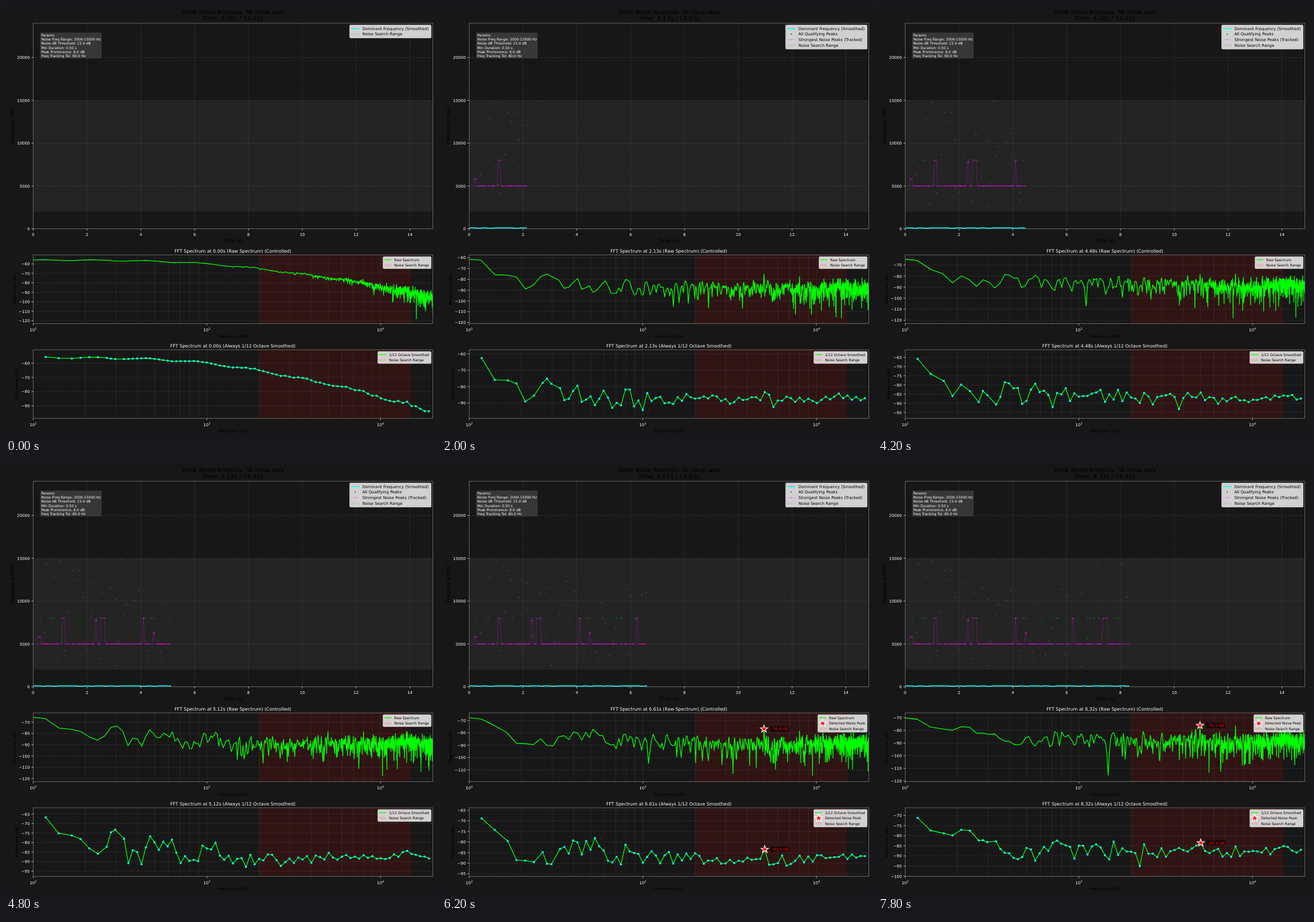
An HTML page that plays this animation: 748 px wide and 748 px high, repeating every 8000 ms.

```html
<!DOCTYPE html>
<html lang="en">
<head>
<meta charset="utf-8">
<title>Tonal noise analysis</title>
<style>
  html, body { margin: 0; width: 100%; height: 100%; overflow: hidden; background: #171717; }
  svg { display: block; width: 100%; height: 100%; }
  text { font-family: "DejaVu Sans", sans-serif; text-rendering: geometricPrecision; white-space: pre; }
  .grid { stroke: #808080; stroke-opacity: .36; stroke-width: .6; stroke-dasharray: 2.2 1; }
  .spine { fill: none; stroke: #808080; stroke-width: .75; }
  .tick { stroke: #fff; stroke-width: .7; }
  .box { fill: #fff; fill-opacity: .8; stroke: #ccc; stroke-opacity: .8; stroke-width: .85; }
  .line { fill: none; stroke: #0f0; stroke-width: 1.3; stroke-linejoin: round; }
  .peak { fill: #008000; fill-opacity: .8; }
  .track { fill: none; stroke: #f0f; stroke-opacity: .5; stroke-width: .5; }
  .hit { fill: #f0f; fill-opacity: .45; }
  .star { fill: #f00; stroke: #fff; stroke-width: 1.1; }
</style>
</head>
<body>
<svg viewBox="0 0 748 748"><g id="back"></g><g id="live"></g></svg>
<script>
const STEP = 200, STEPS = 40, DT = 0.64 / 3;
const BIN = 23.4375, LOW_BIN = 4, HIGH_BIN = 855, TONE_BIN = 213, SECOND_BIN = 341;
const L = 47.3, R = 742.4, MID = (L + R) / 2;
const TOP = { y: 30, h: 357.5 }, RAW = { y: 433, h: 119.4 }, OCT = { y: 598, h: 119.2 };

const timeX = t => L + t * 46.81;
const freqY = f => 387.5 - f * 0.014896;
const logX = f => L + 302 * Math.log10(f / 100);
const n1 = v => v.toFixed(1);

function rng(seed) {
  let s = seed >>> 0;
  return () => {
    s = (s + 0x6D2B79F5) >>> 0;
    let t = Math.imul(s ^ (s >>> 15), s | 1);
    t ^= t + Math.imul(t ^ (t >>> 7), t | 61);
    return ((t ^ (t >>> 14)) >>> 0) / 4294967296;
  };
}

// svg helpers
const line = (x1, y1, x2, y2, cls) => `<line x1="${n1(x1)}" y1="${n1(y1)}" x2="${n1(x2)}" y2="${n1(y2)}" class="${cls}"/>`;
const rect = (x, y, w, h, rest = '') => `<rect x="${n1(x)}" y="${n1(y)}" width="${n1(w)}" height="${n1(h)}" ${rest}/>`;
const dot = (x, y, r, rest) => `<circle cx="${n1(x)}" cy="${n1(y)}" r="${r}" ${rest}/>`;
const text = (x, y, size, s, fill = '#fff', anchor = 'middle') =>
  `<text x="${n1(x)}" y="${n1(y)}" font-size="${size}" fill="${fill}" text-anchor="${anchor}">${s}</text>`;
const upright = (x, y, size, s) =>
  `<text transform="translate(${n1(x)} ${n1(y)}) rotate(-90)" font-size="${size}" text-anchor="middle">${s}</text>`;
const poly = (pts, rest) => `<polyline points="${pts.map(p => n1(p[0]) + ',' + n1(p[1])).join(' ')}" ${rest}/>`;

function star(x, y) {
  const pts = [];
  for (let i = 0; i < 10; i++) {
    const r = i % 2 ? 2.6 : 6.7, a = i * Math.PI / 5;
    pts.push(n1(x + r * Math.sin(a)) + ',' + n1(y - r * Math.cos(a)));
  }
  return `<polygon points="${pts.join(' ')}" class="star"/>`;
}

// Levels in dB: the opening roll-off and the later noise floor
const rollOff = f => -56 + 0.6 * Math.cos(9 * Math.log(f / 222))
  - 13 * Math.log10(1 + (f / 1000) ** 2) - 5.5 * (f / 20000) ** 3;
const noiseFloor = f => -88 + 9.5 * Math.exp(-f / 800) + 2.3 * Math.exp(-(((f - 14800) / 2600) ** 2));

const detected = k => k % 12 === 3 || k % 12 === 7;

// Windowed complex noise with two tones, in dB around zero
function windowedNoise(k) {
  const rand = rng(k * 7919 + 17), re = [], im = [];
  for (let b = 0; b <= HIGH_BIN + 1; b++) {
    const r = Math.sqrt(-Math.log(1 - rand())), a = 2 * Math.PI * rand();
    re[b] = r * Math.cos(a);
    im[b] = r * Math.sin(a);
  }
  if (k) {
    re[TONE_BIN] = 4.4 + re[TONE_BIN] / 2;
    re[SECOND_BIN] = 3.9 + re[SECOND_BIN] / 2;
  }
  const hann = (w, b) => w[b] - (w[b - 1] + w[b + 1]) / 2;
  return b => 10 * Math.log10((hann(re, b) ** 2 + hann(im, b) ** 2) / 1.5 + 1e-4);
}

function rawSpectrum(k) {
  const noise = windowedNoise(k), out = [];
  const rumble = -62.5 - 0.3 * (k - 10);
  for (let b = LOW_BIN; b <= HIGH_BIN; b++) {
    const f = b * BIN;
    let v;
    if (k === 0) v = rollOff(f) + noise(b) * Math.min(1, (f / 18000) ** 1.3);
    else if (b <= 5) v = rumble + 1.5 * (5 - b);
    else {
      const hum = (rumble + 80) * Math.exp((5 - b) / 1.2);
      v = noiseFloor(f) + hum + Math.max(noise(b), b < 45 ? -9 : -30) * (b < 8 ? 0.5 : 1);
    }
    out[b] = Math.max(v, -118);
  }
  return out;
}

// Mean power in twelfth-octave bands
function octaveBands(raw) {
  const out = [], half = 2 ** (1 / 24);
  for (let n = -37; n <= 51; n++) {
    const c = 1000 * 2 ** (n / 12);
    let sum = 0, count = 0;
    for (let b = Math.ceil(c / half / BIN); b * BIN < c * half; b++) {
      sum += 10 ** (raw[b] / 10);
      count++;
    }
    if (count) out.push([c, 10 * Math.log10(sum / count)]);
  }
  return out;
}

// Scattered peaks [s, Hz], a quarter of them on the 8 kHz tone
const peaks = (() => {
  const rand = rng(23), out = [];
  for (let i = 0; i < 80; i++) {
    const t = 0.26 + (i + rand()) * 0.1;
    out.push([t, rand() < 0.25 ? 8000 : 2200 + 12700 * rand()]);
  }
  return out;
})();

// Jumps of the tracked tone: start (s), length (s), height (Hz)
const jumps = [[.19, .07, 5800], [1.08, .08, 8000], [2.31, .05, 7750], [2.51, .14, 8000],
  [4.09, .02, 8000], [4.465, .035, 6300], [6.22, .03, 8000], [7.34, .16, 8000]];

const heard = (() => {
  const rand = rng(5), out = [];
  let dense = true;
  for (let i = 7; i <= 390; i++) {
    if (i % 3 === 0) dense = rand() < 0.8;
    if (rand() < (dense ? 0.8 : 0.25)) out.push(i * DT / 10);
  }
  return out;
})();

function trackedTone(t) {
  const times = heard.filter(s => s <= t + .001);
  if (!times.length) return '';
  const past = jumps.filter(j => j[0] + j[1] + .03 <= t);
  const pts = [[times[0], 5000]], dots = [];
  for (const [s, len, f] of past) {
    pts.push([s - .03, 5000], [s, f], [s + len, f], [s + len + .03, 5000]);
    dots.push([s, f], [s + len / 2, f], [s + len, f]);
  }
  pts.push([Math.max(times[times.length - 1], pts[pts.length - 1][0]), 5000]);
  for (const s of times) {
    if (!past.some(j => s > j[0] - .03 && s < j[0] + j[1] + .03)) dots.push([s, 5000]);
  }
  const at = p => [timeX(p[0]), freqY(p[1])];
  return poly(pts.map(at), 'class="track"') + dots.map(p => dot(...at(p), 1, 'class="hit"')).join('');
}

function dominant(t) {
  const pts = [];
  for (let s = 0; s <= t + .001; s += DT / 10) {
    const w = Math.sin(s * 13.5) + .7 * Math.sin(s * 5.3 + 1);
    pts.push([timeX(s), freqY(w > -.35 ? 112 : 62)]);
  }
  return poly(pts, 'fill="none" stroke="#0ff" stroke-width="1.6"');
}

const swatches = {
  line: (x, y, w) => `<path d="M${x} ${y}h${w}" stroke="#0f0" stroke-width="1.4"/>`,
  cyan: (x, y, w) => `<path d="M${x} ${y}h${w}" stroke="#0ff" stroke-width="1.6"/>`,
  grey: (x, y, w) => rect(x, y - w * .175, w, w * .35, 'fill="#808080" fill-opacity=".12"'),
  red: (x, y, w) => rect(x, y - w * .175, w, w * .35, 'fill="#f00" fill-opacity=".11"'),
  peak: (x, y, w) => dot(x + w / 2, y, 1.2, 'class="peak"'),
  track: (x, y, w) => `<path d="M${x} ${y}h${w}" class="track"/>` + dot(x + w / 2, y, 1.1, 'class="hit"'),
  star: (x, y, w) => star(x + w / 2, y)
};

// rows: [swatch, label]
function legend(x, y, size, gap, rows) {
  const hx = x + size * .4, tx = hx + size * 2.8, first = size * .9;
  return rect(x, y, 739.6 - x, first + (rows.length - 1) * gap + size * .98, 'rx="1.6" class="box"') +
    rows.map(([kind, label], i) => {
      const cy = y + first + i * gap;
      return swatches[kind](hx, cy, size * 2) + text(tx, cy + size * .36, size, label, '#000', 'start');
    }).join('');
}

function overview(k, t) {
  const rows = [['cyan', 'Dominant Frequency (Smoothed)']];
  if (k) rows.push(['peak', 'All Qualifying Peaks'], ['track', 'Strongest Noise Peaks (Tracked)']);
  rows.push(['grey', 'Noise Search Range']);
  return text(MID, 24.8, 10.39, `Time: ${t.toFixed(2)}s / 14.85s`, '#000') +
    `<g clip-path="url(#clipTop)">${dominant(t)}` +
    peaks.filter(p => p[0] <= t).map(p => dot(timeX(p[0]), freqY(p[1]), 1.15, 'class="peak"')).join('') +
    trackedTone(t) + '</g>' + rect(L, TOP.y, R - L, TOP.h, 'class="spine"') +
    legend(597.8, 33, 6.95, 9.65, rows);
}

function spectrumPlot(ax, clip, title, pts, opt) {
  const vals = pts.filter(p => p[0] >= 100 && p[0] <= 20000).map(p => p[1]);
  const hi = Math.max(...vals) + 5, lo = Math.min(...vals) - 5, span = hi - lo;
  const Y = v => ax.y + (hi - v) / span * ax.h;
  const step = span <= 40 ? 5 : 10;
  let s = '', chars = 3;
  for (let v = Math.ceil(lo / step) * step; v <= hi; v += step) {
    const y = Y(v), label = '\u2212' + -v;
    chars = Math.max(chars, label.length);
    s += line(L, y, R, y, 'grid') + line(L - 3, y, L, y, 'tick') + text(41.3, y + 2.6, 6.93, label, '#fff', 'end');
  }
  s += upright(16.8 + (4 - chars) * 4.4, ax.y + ax.h / 2, 6.93, 'Magnitude (dB)');
  s += text(MID - .2, ax.y - 4.3, 7.85, title);
  const xy = pts.map(p => [logX(p[0]), Y(p[1])]);
  s += `<g clip-path="url(#${clip})">` + poly(xy, 'class="line"');
  if (opt.dots) s += xy.map(p => dot(p[0], p[1], 1.85, 'fill="#0ff"')).join('');
  s += '</g>' + rect(L, ax.y, R - L, ax.h, 'class="spine"');
  const rows = [['line', opt.name], ['red', 'Noise Search Range']];
  if (opt.mark) {
    const x = logX(opt.mark[0]), y = Y(opt.mark[1]);
    s += rect(x + 10.5, y - 4.6, 33, 9, 'rx="1" fill="#000" fill-opacity=".6"') +
      text(x + 12.5, y + 2.5, 6.93, opt.mark[1].toFixed(1) + ' dB', '#f00', 'start') + star(x, y);
    rows.splice(1, 0, ['star', 'Detected Noise Peak']);
  }
  return s + legend(opt.left, ax.y + 3, 6.06, 9.5, rows);
}

function render(k) {
  const t = k * DT, at = `FFT Spectrum at ${t.toFixed(2)}s`, on = detected(k);
  const raw = rawSpectrum(k), bands = octaveBands(raw), rawPts = [];
  raw.forEach((v, b) => rawPts.push([b * BIN, v]));
  return overview(k, t) +
    spectrumPlot(RAW, 'clipRaw', at + ' (Raw Spectrum) (Controlled)', rawPts,
      { name: 'Raw Spectrum', left: on ? 653.8 : 655.8, mark: on && [TONE_BIN * BIN, raw[TONE_BIN]] }) +
    spectrumPlot(OCT, 'clipOct', at + ' (Always 1/12 Octave Smoothed)', bands,
      { name: '1/12 Octave Smoothed', left: 646.8, dots: true, mark: on && bands.find(p => p[0] > 5000) });
}

function backdrop() {
  const clip = (id, a) => `<clipPath id="${id}">${rect(L, a.y, R - L, a.h)}</clipPath>`;
  let s = '<defs>' + clip('clipTop', TOP) + clip('clipRaw', RAW) + clip('clipOct', OCT) + '</defs>';
  s += rect(0, 0, 748, 748, 'fill="#171717"');
  s += text(MID, 13.8, 10.39, 'Tonal Noise Analysis: 5k tonal.wav', '#000');
  s += rect(L, freqY(15000), R - L, freqY(2000) - freqY(15000), 'fill="#808080" fill-opacity=".12"');
  for (let t = 0; t <= 14; t += 2) {
    const x = timeX(t);
    s += line(x, TOP.y, x, 387.5, 'grid') + line(x, 387.5, x, 390.5, 'tick') + text(x, 399.6, 6.93, t);
  }
  for (let f = 0; f <= 20000; f += 5000) {
    const y = freqY(f);
    s += line(L, y, R, y, 'grid') + line(L - 3, y, L, y, 'tick') + text(41.3, y + 2.6, 6.93, f, '#fff', 'end');
  }
  s += text(MID, 411, 8.66, 'Time (s)', '#000') + upright(13.6, 208.7, 8.66, 'Frequency (Hz)');
  s += rect(59.2, 46.2, 107.2, 45, 'rx="1.8" fill="#373737"');
  ['Params:', 'Noise Freq Range: 2000-15000 Hz', 'Noise dB Threshold: 15.0 dB', 'Min Duration: 0.50 s',
    'Peak Prominence: 8.0 dB', 'Freq Tracking Tol: 80.0 Hz']
    .forEach((p, i) => { s += text(61.2, 52.8 + i * 7.28, 6.08, p, '#fff', 'start'); });
  for (const a of [RAW, OCT]) {
    const end = a.y + a.h;
    s += rect(logX(2000), a.y, logX(15000) - logX(2000), a.h, 'fill="#f00" fill-opacity=".11"');
    for (let d = 2; d <= 4; d++) {
      for (let m = 1; m < 10 && m * 10 ** d < 20000; m++) {
        const x = logX(m * 10 ** d);
        s += line(x, a.y, x, end, 'grid');
      }
      const x = logX(10 ** d);
      s += line(x, end, x, end + 3, 'tick') +
        text(x, end + 13.4, 6.93, `10<tspan font-size="4.85" dy="-2.7">${d}</tspan>`);
    }
    s += text(MID, end + 24.2, 6.93, 'Frequency (Hz)', '#000');
  }
  return s;
}

const live = document.getElementById('live');
document.getElementById('back').innerHTML = backdrop();
const start = performance.now();
let shown = -1;

function update() {
  const k = Math.floor((performance.now() - start) / STEP) % STEPS;
  if (k !== shown) live.innerHTML = render(shown = k);
  requestAnimationFrame(update);
}
update();
</script>
</body>
</html>
```
